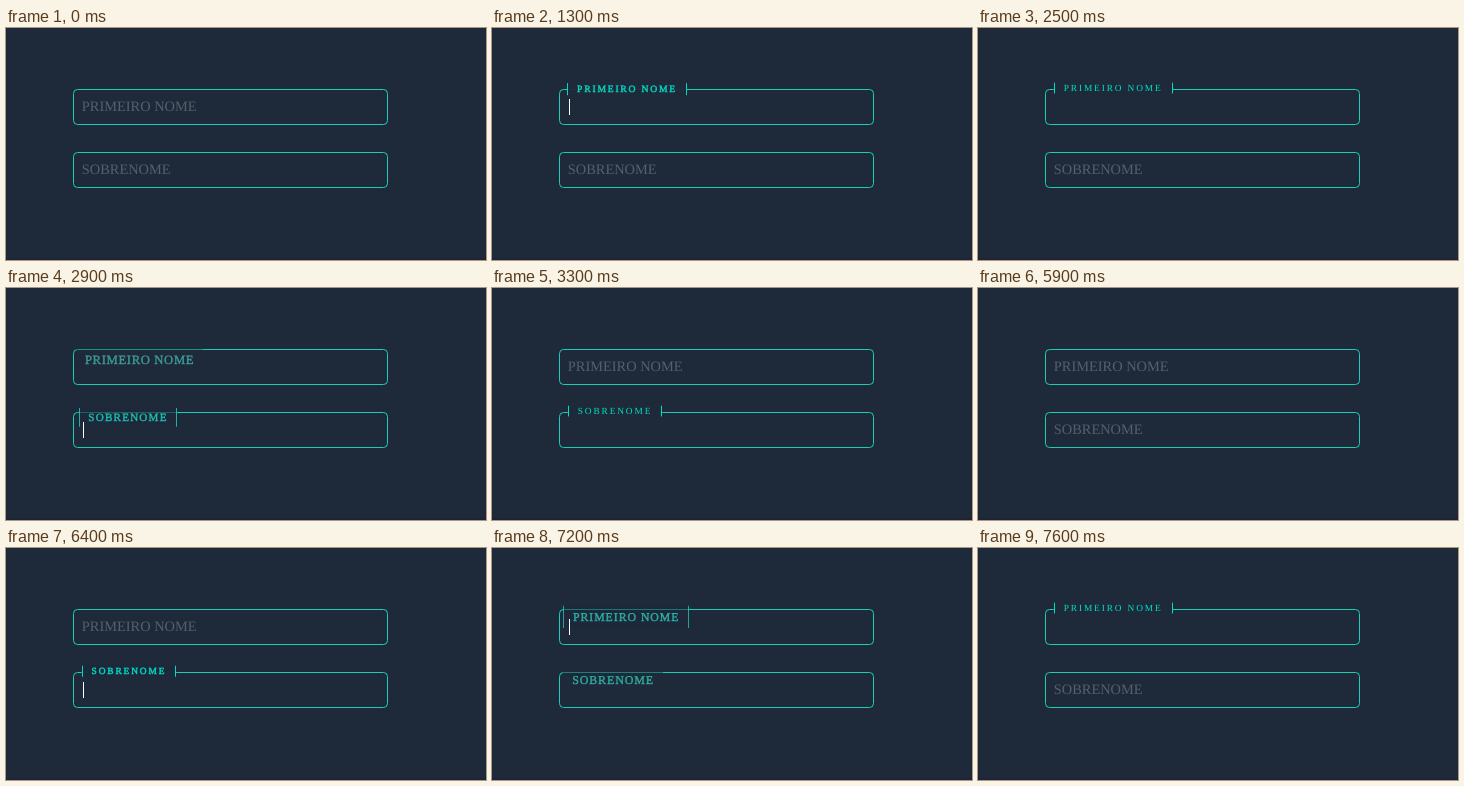
An HTML page with a canvas for the animation above (8 s loop, 480x232 px).

```html
<!DOCTYPE html>
<html lang="pt">
<head>
<meta charset="utf-8">
<title>Campos flutuantes</title>
<style>
  html, body { margin: 0; width: 100%; height: 100%; overflow: hidden; background: #1e2a3a; }
  canvas { display: block; }
</style>
</head>
<body>
<canvas id="stage" width="480" height="232"></canvas>
<script>
const ctx = document.getElementById('stage').getContext('2d');
const LOOP = 8000, DURATION = 500;
const BG = [30, 42, 58], TEAL = [0, 223, 196], BORDER = '#17cfb6';
const FONT = '"Liberation Serif", "Times New Roman", serif';

// focus: [start, end] of each focus; caret: [on, off] of each blink
const fields = [
  { text: 'PRIMEIRO NOME', y: 61,
    focus: [[950, 2710], [7050, 9000]],
    caret: [[950, 1500], [2080, 2500], [7050, 7590]] },
  { text: 'SOBRENOME', y: 124,
    focus: [[2710, 4950], [5970, 7050]],
    caret: [[2710, 3290], [3790, 4290], [4860, 4950], [5970, 6490], [6990, 7050]] }
];

const mix = (a, b, p) => a + (b - a) * p;
const within = (t, spans) => spans.some(([a, b]) => t >= a && t < b);

// cubic-bezier(.25, .1, .25, 1)
function ease(x) {
  if (x <= 0) return 0;
  if (x >= 1) return 1;
  const curve = (a, b, s) => 3 * a * s * (1 - s) ** 2 + 3 * b * s * s * (1 - s) + s ** 3;
  let lo = 0, hi = 1;
  for (let i = 0; i < 24; i++) {
    const mid = (lo + hi) / 2;
    if (curve(.25, .25, mid) < x) lo = mid; else hi = mid;
  }
  return curve(.1, 1, lo);
}

function focusAmount(t, spans) {
  let p = 0;
  for (const [a, b] of spans) {
    if (t >= a) p = t < b ? ease((t - a) / DURATION) : 1 - ease((t - b) / DURATION);
  }
  return p;
}

// White at 25% to solid teal, blended with premultiplied alpha
function labelColor(p) {
  const alpha = mix(.25, 1, p);
  const rgb = TEAL.map(c => Math.round(mix(255 * .25, c, p) / alpha));
  return `rgba(${rgb},${alpha})`;
}

function drawLabel(field, p, focused) {
  const size = mix(14.4, 9.36, p), pad = 9 * (1 - p);
  const left = 66.8 + 9 * p, top = field.y - 6.3 * p;
  const edge = focused ? .9 * p : 0;
  const height = size * 1.15 + pad * 2;

  ctx.font = `${size}px ${FONT}`;
  ctx.letterSpacing = `${1.872 * p}px`;
  const width = ctx.measureText(field.text).width + 18 + edge * 2;

  ctx.fillStyle = `rgba(${BG},${p})`;
  ctx.fillRect(left, top, width, height);

  const color = labelColor(p);
  ctx.fillStyle = ctx.strokeStyle = color;
  const x = left + edge + 9, y = top + pad + size * .891;
  ctx.fillText(field.text, x, y);
  if (p > 0 && p < 1) {
    ctx.lineWidth = .4;
    ctx.strokeText(field.text, x, y);
  }
  if (focused) {
    ctx.fillRect(Math.round(left), top, 1, height);
    ctx.fillRect(Math.round(left + width - 1), top, 1, height);
  }
}

function drawField(field, t) {
  ctx.strokeStyle = BORDER;
  ctx.lineWidth = 1;
  ctx.beginPath();
  ctx.roundRect(67.5, field.y + .5, 314, 35, 4);
  ctx.stroke();

  drawLabel(field, focusAmount(t, field.focus), within(t, field.focus));

  if (within(t, field.caret)) {
    ctx.fillStyle = '#fff';
    ctx.fillRect(77, field.y + 10, 1, 16);
  }
}

function draw(t) {
  ctx.fillStyle = `rgb(${BG})`;
  ctx.fillRect(0, 0, 480, 232);
  ctx.fillStyle = '#1f2338';
  ctx.fillRect(0, 230, 480, 2);
  fields.forEach(field => drawField(field, t));
}

ctx.textRendering = 'geometricPrecision';
const begin = performance.now();
function tick() {
  draw((performance.now() - begin) % LOOP);
  requestAnimationFrame(tick);
}
tick();
</script>
</body>
</html>
```
